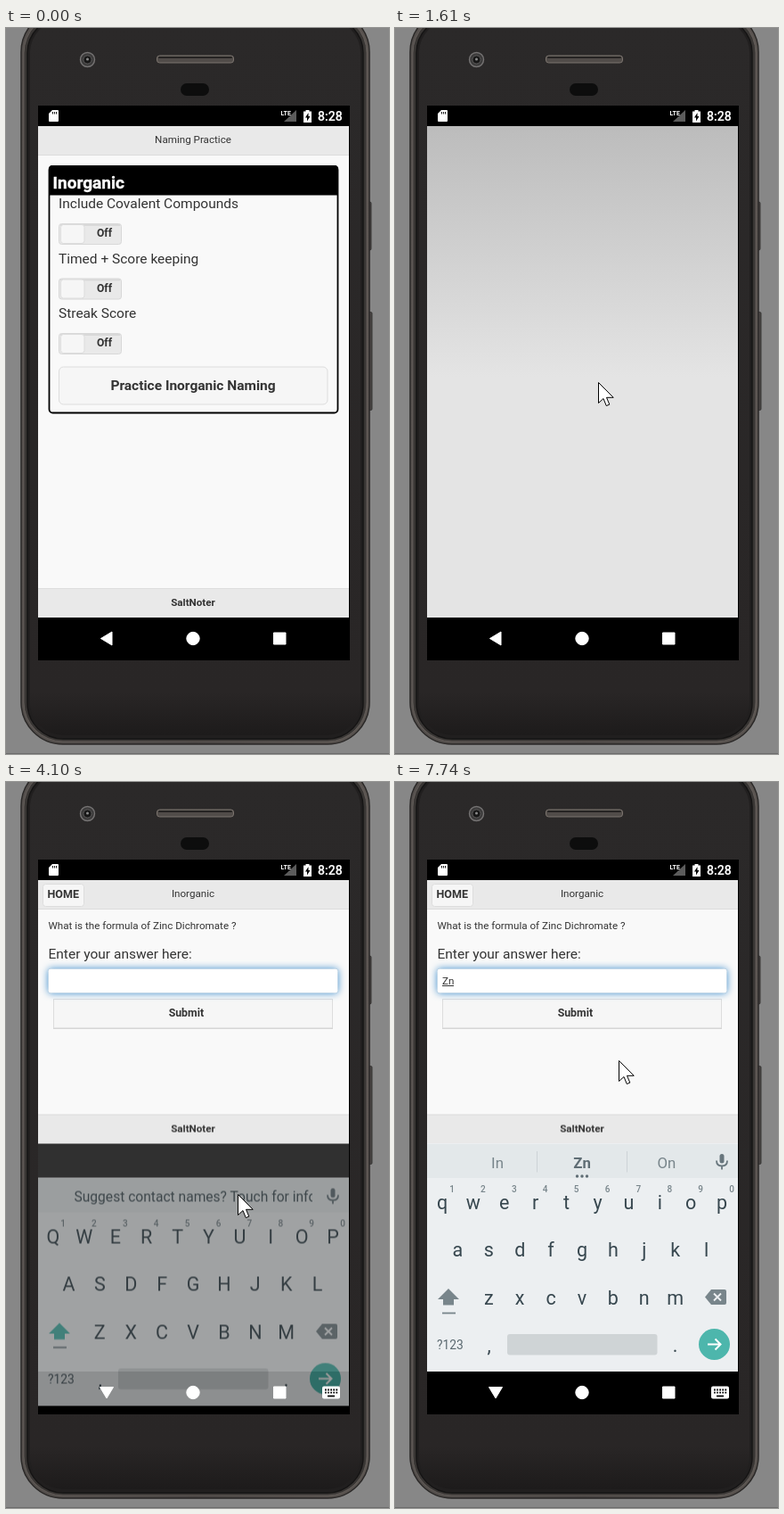
Recreate the animation shown at these times as an HTML page. Size 430 by 814 pixels, loop 8 s.

```html
<!DOCTYPE html>
<html lang="en">
<head>
<meta charset="utf-8">
<title>Naming practice</title>
<style>
html, body { margin: 0; width: 100%; height: 100%; overflow: hidden; background: #878787; }
svg { display: block; width: 430px; height: 814px; font-family: Roboto, sans-serif; }
.b { font-weight: 700; }
.m { text-anchor: middle; }
.s { font-size: 11.63px; }
.l { font-size: 15.5px; }
.ink { fill: #333; }
.btn { fill: #f6f6f6; stroke: #ddd; }
.key { font-size: 21.5px; fill: #37474f; text-anchor: middle; }
.num { font-size: 10px; font-weight: 500; fill: #78858b; text-anchor: middle; }

/* Every track runs on the same 8 s clock. */
.t { animation: 8s step-end infinite; }

#cursor { animation-name: move; }
@keyframes move {
  0% { transform: translate(-60px, -60px); }
  1.375% { transform: translate(331px, 688px); animation-timing-function: steps(2); }
  3.25% { transform: translate(305px, 575px); animation-timing-function: steps(2); }
  5.25% { transform: translate(255px, 440px); animation-timing-function: steps(3); }
  8.125% { transform: translate(228px, 397px); }
  25.875% { transform: translate(238px, 410px); }
  26.75% { transform: translate(248px, 424px); animation-timing-function: steps(3); }
  29.875% { transform: translate(182px, 267px); animation-timing-function: steps(6); }
  35.625%, 44.375% { transform: translate(182px, 218px); }
  44.375% { animation-timing-function: steps(5); }
  49.25% { transform: translate(234px, 384px); animation-timing-function: steps(2); }
  51.25% { transform: translate(260px, 462px); animation-timing-function: steps(3); }
  54.125%, 57.875% { transform: translate(266px, 468px); }
  57.875% { animation-timing-function: steps(4); }
  61.75% { transform: translate(297px, 418px); animation-timing-function: steps(4); }
  65.625%, 100% { transform: translate(251px, 312px); }
}
#tap { animation-name: tap; }
@keyframes tap {
  0%, 15%, 42.5%, 100% { opacity: 0; }
  13.125%, 40.375% { opacity: .47; }
}

#menu { animation-name: leave; }
@keyframes leave {
  0%, 16% { opacity: 1; }
  16%, 18% { animation-timing-function: steps(2); }
  18% { opacity: .38; }
  19.875%, 100% { opacity: 0; }
}
#hot { animation-name: hot; }
@keyframes hot {
  0%, 19.875%, 100% { opacity: 0; }
  15%, 16% { opacity: 1; }
  16%, 18% { animation-timing-function: steps(2); }
  18% { opacity: .31; }
}
#go { animation-name: go; }
@keyframes go {
  0% { fill: #333; opacity: 1; }
  15% { fill: #fff; }
  17% { fill: #8fbbdd; }
  18% { fill: #4184bd; opacity: 1; animation-timing-function: steps(2); }
  19.875%, 100% { fill: #4184bd; opacity: 0; }
}
#quiz { animation-name: enter; }
@keyframes enter {
  0%, 19.875% { opacity: 0; }
  19.875% { animation-timing-function: steps(4); }
  23.75%, 100% { opacity: 1; }
}
#glow { animation-name: glow; filter: drop-shadow(0 0 4.5px #38c); }
@keyframes glow { 0% { opacity: 0; } 42.5% { opacity: .5; } 43.375%, 100% { opacity: 1; } }

#caret { animation-name: caret; }
@keyframes caret {
  0%, 50.25%, 61.75%, 73.5% { opacity: 0; transform: none; }
  45.375%, 56%, 67.75% { opacity: 1; transform: none; }
  74.5% { opacity: 1; transform: translateX(7px); }
  77.5%, 89.875% { opacity: 1; transform: translateX(13px); }
  84.125%, 96.75%, 100% { opacity: 0; transform: translateX(13px); }
}
#foot { animation-name: lift; }
@keyframes lift { 0% { transform: none; } 50.25%, 100% { transform: translateY(-255.5px); } }
#under { animation-name: under; }
@keyframes under { 0% { opacity: 0; } 50.25%, 100% { opacity: 1; } }
#board { animation-name: rise; }
@keyframes rise {
  0% { opacity: 0; transform: translateY(38.5px); }
  51.25% { opacity: .6; transform: translateY(38.5px); animation-timing-function: steps(3); }
  54.125%, 100% { opacity: 1; transform: none; }
}
#back { animation-name: toNone; }
.open { animation-name: toOpen; }
@keyframes toNone { 0% { opacity: 1; } 47.25%, 100% { opacity: 0; } }
@keyframes toOpen { 0% { opacity: 0; } 47.25%, 100% { opacity: 1; } }
#hintBig { animation-name: hintBig; }
@keyframes hintBig { 0% { opacity: 1; } 54.125%, 100% { opacity: 0; } }
#hint { animation-name: hint; }
@keyframes hint { 0%, 75.375%, 100% { opacity: 0; } 54.125% { opacity: 1; } }
#upper { animation-name: upper; }
@keyframes upper { 0% { opacity: 1; } 75.375%, 100% { opacity: 0; } }
.lower { animation-name: lower; }
@keyframes lower { 0% { opacity: 0; } 75.375%, 100% { opacity: 1; } }
#first { animation-name: first; }
@keyframes first { 0%, 79.375%, 100% { opacity: 0; } 75.375% { opacity: 1; } }
.second { animation-name: second; }
@keyframes second { 0% { opacity: 0; } 79.375%, 100% { opacity: 1; } }
#z { animation-name: z; }
@keyframes z { 0% { opacity: 0; } 74.5%, 100% { opacity: 1; } }
#n { animation-name: n; }
@keyframes n { 0% { opacity: 0; } 77.5%, 100% { opacity: 1; } }
</style>
</head>
<body>
<svg viewBox="0 0 430 814">
  <defs>
    <linearGradient id="back-fill" x1="0" y1="0" x2="0" y2="1">
      <stop offset="0" stop-color="#bcbcbc"/><stop offset=".51" stop-color="#e4e4e4"/>
    </linearGradient>
    <linearGradient id="rim" x1="0" y1="0" x2="1" y2="0">
      <stop offset="0" stop-color="#55504d"/><stop offset=".5" stop-color="#45413f"/><stop offset="1" stop-color="#5a5450"/>
    </linearGradient>
    <linearGradient id="face" x1="0" y1="0" x2="0" y2="1">
      <stop offset="0" stop-color="#2b2929"/><stop offset=".94" stop-color="#292626"/><stop offset="1" stop-color="#1d1b1b"/>
    </linearGradient>
  </defs>

  <!-- phone -->
  <g id="phone">
    <rect width="430" height="814" fill="#878787"/>
    <rect y="813" width="430" height="1" fill="#6b6b6b"/>
    <rect x="406" y="195" width="4" height="54" rx="1.5" fill="#4a4644" stroke="#2d2b2a" stroke-width=".8"/>
    <rect x="406" y="318.500" width="5" height="110" rx="1.5" fill="#4a4644" stroke="#2d2b2a" stroke-width=".8"/>
    <rect x="17" y="-20" width="391" height="823" rx="47" fill="url(#rim)" stroke="#2b2928" stroke-width="1.5"/>
    <rect x="20" y="-16" width="385" height="816" rx="44" fill="#393634" stroke="#6a6460" stroke-width=".8"/>
    <rect x="24" y="-12" width="377" height="809" rx="40" fill="#211f1f" stroke="#151414" stroke-width="1.4"/>
    <rect x="27" y="-9" width="371" height="802" rx="37" fill="url(#face)"/>
    <circle cx="91.500" cy="35.500" r="8" fill="#3c3b3b" stroke="#757373" stroke-width="1.4"/>
    <circle cx="91.500" cy="35.500" r="4.6" fill="#171717" stroke="#5c5b5b"/>
    <circle cx="91.500" cy="35" r="1.5" fill="#8a8a8a"/>
    <rect x="169.500" y="31" width="86" height="8" rx="3" fill="#514c49" stroke="#7b746e"/>
    <rect x="171" y="32" width="83" height="2" rx="1" fill="#262423"/>
    <rect x="196" y="62" width="32" height="14" rx="7" fill="#0d0d0d"/>
    <rect x="36" y="87" width="350" height="622"/>
  </g>

  <!-- status bar -->
  <g id="status" fill="#fff">
    <path d="M52 92h6q1 0 1 1v11q0 1-1 1h-9q-1 0-1-1v-8z"/>
    <path d="M52.500 94v2.500M54.500 94v2.500M56.500 94v2.500" stroke="#000" stroke-width=".9"/>
    <text x="308.500" y="98" font-size="7" class="b">LTE</text>
    <path d="M326 92v13h-14z" fill="#5c5c5c"/>
    <path d="M336.500 92h4v1.500h2.500v12.500h-9v-12.500h2.500z"/>
    <path d="M339.500 95l-3.500 5.500h2v4l3.500-5.500h-2z" fill="#000"/>
    <text x="350" y="104" font-size="14" font-weight="500" stroke="#fff" stroke-width=".2">8:28</text>
  </g>

  <rect x="36" y="110" width="349" height="551" fill="url(#back-fill)"/>

  <!-- start page -->
  <g id="menu" class="t ink">
    <rect x="36" y="110" width="349" height="551" fill="#f9f9f9"/>
    <path d="M36 110h349v33H36zM36 628h349v33H36z" fill="#e9e9e9"/>
    <path d="M36 142.500h349M36 628.500h349" stroke="#ddd"/>
    <text x="210" y="129.300" class="s m">Naming Practice</text>
    <rect x="48.500" y="155" width="324" height="276.500" rx="4" fill="#f9f9f9" stroke="#000" stroke-width="1.8"/>
    <path d="M48 187.500V158q0-4 4-4h317q4 0 4 4v29.500z" fill="#000"/>
    <text x="52.500" y="180" font-size="19" class="b" fill="#fff" stroke="#fff" stroke-width=".35">Inorganic</text>
    <g id="options"></g>
    <rect x="59.500" y="380" width="301.500" height="42" rx="5" class="btn"/>
    <text x="210" y="647.500" class="s b m">SaltNoter</text>
  </g>
  <rect id="hot" class="t" x="59" y="379.500" width="302.500" height="43" rx="5" fill="#38c"/>
  <text id="go" class="t l b m" x="210" y="406.300">Practice Inorganic Naming</text>

  <!-- question page -->
  <g id="quiz" class="t ink">
    <rect x="36" y="110" width="349" height="551" fill="#f9f9f9"/>
    <path d="M36 110h349v33H36z" fill="#e9e9e9"/>
    <path d="M36 142.500h349" stroke="#ddd"/>
    <rect x="41.500" y="114.500" width="46" height="25" rx="3" class="btn"/>
    <text x="64.200" y="130.400" font-size="12.500" class="b m">HOME</text>
    <text x="210" y="129.300" class="s m">Inorganic</text>
    <text x="47.500" y="165" class="s">What is the formula of Zinc Dichromate ?</text>
    <text x="47.500" y="198" class="l">Enter your answer here:</text>
    <rect x="47.500" y="209.500" width="325" height="27" rx="3" fill="#fff" stroke="#d6d6d6"/>
    <path d="M49 211.500h322" stroke="#eee" stroke-width="2"/>
    <rect x="53.500" y="243.500" width="313" height="32.500" class="btn"/>
    <path d="M53 276.300h314" stroke="#d0d0d0"/>
    <rect id="glow" class="t" x="47.500" y="209.500" width="325" height="27" rx="3" fill="#fff"/>
    <text x="202.400" y="263.300" font-size="12.300" class="b m">Submit</text>
    <text id="z" class="t s" x="53" y="226.800">Z</text>
    <text id="n" class="t s" x="60" y="226.800">n</text>
    <rect class="t second" x="53" y="228" width="13" height="1"/>
    <rect id="caret" class="t" x="53" y="215" width="1" height="15"/>
    <rect id="under" class="t" x="36" y="405" width="349" height="256" fill="#303030"/>
    <g id="foot" class="t">
      <rect x="36" y="628" width="349" height="33" fill="#e9e9e9"/>
      <path d="M36 628.500h349" stroke="#ddd"/>
      <text x="210" y="647.500" class="s b m">SaltNoter</text>
    </g>
  </g>

  <!-- keyboard -->
  <g id="board" class="t">
    <rect x="36" y="405" width="349" height="256" fill="#eceff1"/>
    <rect x="36" y="406" width="349" height="38" fill="#e3e8ea"/>
    <text id="hintBig" class="t" x="76.500" y="432" font-size="15.600" fill="#45545b">Suggest contact names? Touch for info.</text>
    <rect x="344" y="406" width="41" height="38" fill="#e3e8ea"/>
    <text id="hint" class="t" x="81" y="431.800" font-size="14.600" fill="#45545b">Suggest contact names? Touch for info.</text>
    <g class="t lower m" font-size="16.800" fill="#78858b">
      <path d="M159.500 414v23.500M260.500 414v23.500" stroke="#cdd3d6"/>
      <g fill="#5f6d74"><circle cx="204.500" cy="442" r="1.700"/><circle cx="210" cy="442" r="1.700"/><circle cx="215.500" cy="442" r="1.700"/></g>
      <g id="first" class="t">
        <text x="115" y="432.500">A</text><text x="210" y="432.500" class="b" fill="#5f6d74">Z</text><text x="305" y="432.500">Zoo</text>
      </g>
      <g class="t second">
        <text x="115" y="432.500">In</text><text x="210" y="432.500" class="b" fill="#5f6d74">Zn</text><text x="305" y="432.500">On</text>
      </g>
    </g>
    <g fill="none" stroke="#68767d" stroke-width="1.800">
      <rect x="364.500" y="417" width="5" height="10.500" rx="2.500" fill="#68767d" stroke="none"/>
      <path d="M361 424.500q0 6 6 6t6-6M367 430v4.500"/>
    </g>
    <g id="digits"></g>
    <g id="upper" class="t"></g>
    <g id="low" class="t lower"></g>
    <path d="M53 595.500h15" stroke="#78858b" stroke-width="1.800"/>
    <path d="M355 569h15q2 0 2 2v13q0 2-2 2h-15l-7-8.500z" fill="#78858b"/>
    <path d="M358 573.500l8 8M366 573.500l-8 8" stroke="#eceff1" stroke-width="1.900"/>
    <text x="47" y="635.800" font-size="13.800" fill="#5a686f">?123</text>
    <text x="105.500" y="638.500" class="key">,</text>
    <text x="314.500" y="638.500" class="key">.</text>
    <rect x="126" y="619" width="168.500" height="23.500" rx="3" fill="#cfd4d6"/>
    <circle cx="358.500" cy="630.500" r="17.500" fill="#4db6ac"/>
    <path d="M351 630.500h14M359.500 624.500l6 6-6 6" fill="none" stroke="#fff" stroke-width="2"/>
  </g>

  <!-- navigation bar -->
  <g id="nav" fill="#fff" stroke="#fff" stroke-linejoin="round">
    <path id="back" class="t" d="M106.500 684.500L119 677v15z"/>
    <path class="t open" d="M113 691L105.500 678.500h15z"/>
    <circle cx="210" cy="684.500" r="7.200"/>
    <rect x="300.500" y="678" width="13.500" height="13"/>
    <g class="t open" stroke="none">
      <rect x="355" y="677.500" width="20" height="14" rx="2"/>
      <path d="M358 681.500h14.500M358 684.700h14.500" stroke="#000" stroke-width="1.800" stroke-dasharray="1.8 1.300"/>
      <path d="M361 688.500h8" stroke="#000" stroke-width="1.800"/>
    </g>
  </g>

  <!-- pointer -->
  <g id="cursor" class="t">
    <circle id="tap" class="t" r="18" fill="#ff0"/>
    <path d="M.5.500V23.500L6 18.500L9.300 26.600L12.800 25.100L9.500 17.300H17.200Z" fill="#fff" stroke="#000"/>
  </g>
</svg>
<script>
const $ = id => document.getElementById(id);
const text = (x, y, cls, s) => `<text x="${x}" y="${y}" class="${cls}">${s}</text>`;

$('options').innerHTML = ['Include Covalent Compounds', 'Timed + Score keeping', 'Streak Score'].map((label, i) => {
  const y = 219 + i * 61.5;
  return text(59, y - 17, 'l', label) +
    `<rect x="59.5" y="${y + .5}" width="70" height="23" rx="3" fill="#e9e9e9" stroke="#d8d8d8"/>
     <path d="M61 ${y + 2}h67" stroke="#d9d9d9" stroke-width="2"/>
     <rect x="61.5" y="${y + 1.5}" width="26.500" height="21" rx="3" class="btn"/>` +
    `<text x="102" y="${y + 15.3}" font-size="12.1" class="b">Off</text>`;
}).join('');

const pitch = 34.9;
const rows = [['qwertyuiop', 53, 478.5], ['asdfghjkl', 70.4, 532], ['zxcvbnm', 105.3, 585.5]];
const letters = fix => rows.map(([keys, x, y]) =>
  [...keys].map((k, i) => text(x + i * pitch, y, 'key', fix(k))).join('')).join('');
const shift = color => `<path d="M60 568l12 12h-6v6.500h-12v-6.500h-6z" fill="${color}"/>`;

$('upper').innerHTML = letters(k => k.toUpperCase()) + shift('#4db6ac');
$('low').innerHTML = letters(k => k) + shift('#78858b');
$('digits').innerHTML = [...'1234567890'].map((d, i) => text(64 + i * pitch, 460, 'num', d)).join('');
</script>
</body>
</html>
```
